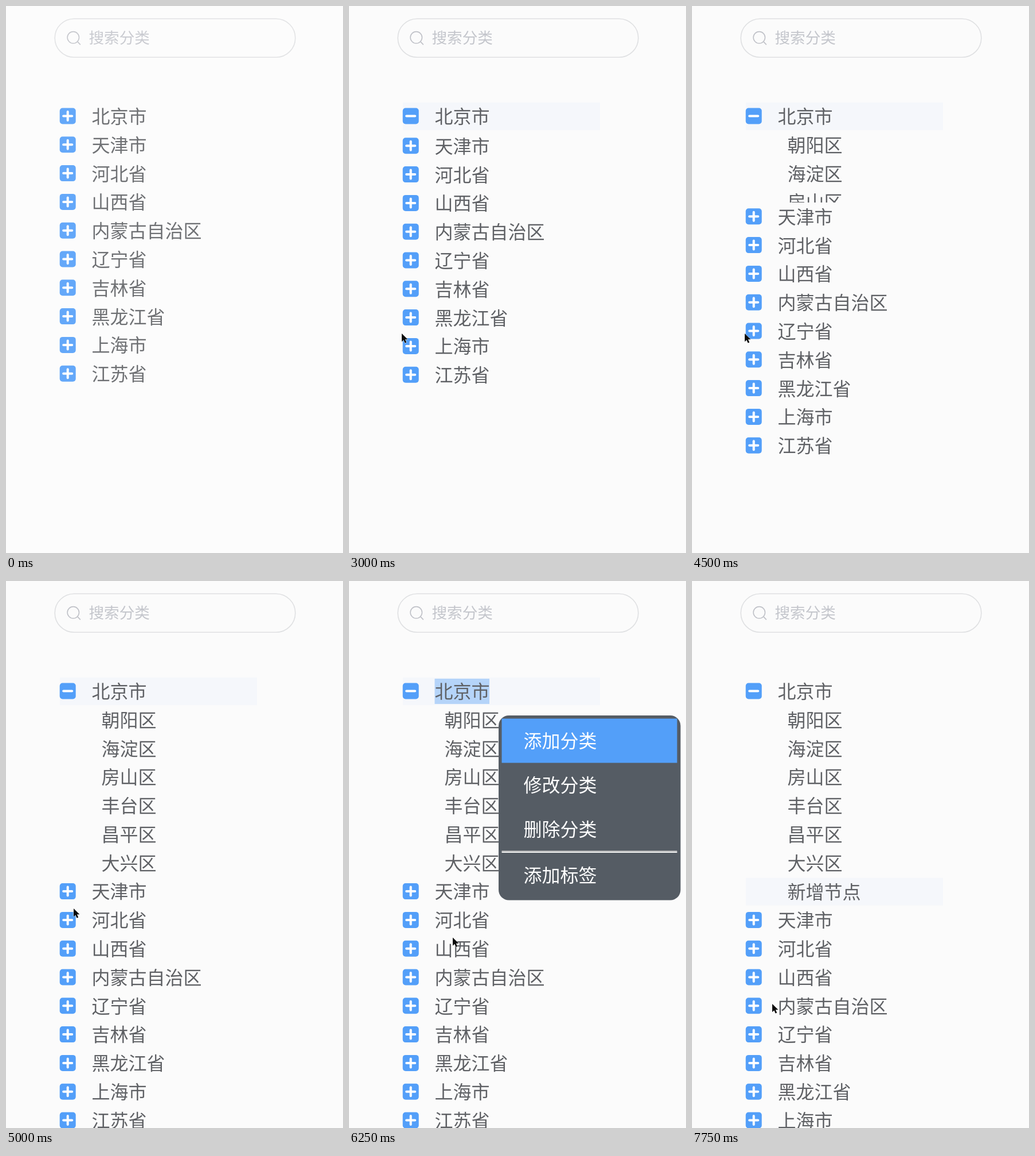
These frames come from a looping animation (588x952 px, 8 s). An HTML page:

```html
<!DOCTYPE html>
<html lang="zh-CN">
<head>
<meta charset="utf-8">
<style>
  html, body { margin: 0; width: 100%; height: 100%; overflow: hidden; background: #fbfbfb; }
  svg { display: block; }
  text { font: 350 32px "Noto Sans CJK SC", "Noto Sans CJK", "Noto Sans CJK JP", sans-serif; fill: #5f6165; }
  #search text { font-size: 26.6px; fill: #c4c6cc; }
  #menu text { fill: #fff; }
  .icon rect { fill: #539ff9; }
  .icon path { stroke: #fff; stroke-width: 4; stroke-linecap: round; }
</style>
</head>
<body>
<svg width="588" height="952" viewBox="0 0 588 952">
  <clipPath id="fold"><rect id="foldBox" x="0" y="217" width="588" height="0"/></clipPath>
  <g id="page">
    <g id="search" fill="none">
      <rect x="85.2" y="22.2" width="419.6" height="67" rx="33.5" stroke="#dfe0e2" stroke-width="1.6"/>
      <path d="M124.8 62.2L129.8 67.4" stroke="#c0c2c8" stroke-width="1.7"/>
      <circle cx="117.3" cy="54.8" r="10.2" stroke="#c0c2c8" stroke-width="1.6"/>
      <text x="144.5" y="65.3">搜索分类</text>
    </g>
    <rect id="current" x="94" width="344" height="48" fill="#f5f7fb"/>
    <rect id="selection" x="149.5" y="170" width="95.5" height="44" fill="#b5d4f9"/>
    <g id="first"></g>
    <g id="children" clip-path="url(#fold)"></g>
    <g id="rest"></g>
  </g>
  <g id="menu">
    <rect x="261" y="234" width="317.5" height="321.5" rx="18" fill="#555c64"/>
    <rect id="hover" x="266.5" y="239.5" width="306" height="77" fill="#539ff9"/>
    <rect x="266.5" y="469" width="306" height="2" fill="#a5a6a8"/>
    <rect x="266.5" y="471" width="306" height="2" fill="#f2f2f2"/>
  </g>
  <path id="cursor" d="M0 0V14.2L3.3 11.2L5.6 16.6L8.2 15.5L5.9 10.3H10.4Z"
        fill="#0a0a0a" stroke="#fff" stroke-width="1" stroke-linejoin="round" paint-order="stroke"/>
</svg>
<script>
const LOOP = 8000, TOP = 191.5, PITCH = 49.8;
const OPEN = PITCH * 6, ADDED = PITCH * 7;
const provinces = ['北京市', '天津市', '河北省', '山西省', '内蒙古自治区', '辽宁省', '吉林省', '黑龙江省', '上海市', '江苏省'];
const districts = ['朝阳区', '海淀区', '房山区', '丰台区', '昌平区', '大兴区', '新增节点'];
const $ = id => document.getElementById(id);

function add(parent, tag, attrs, label = '') {
  const el = document.createElementNS('http://www.w3.org/2000/svg', tag);
  for (const key in attrs) el.setAttribute(key, attrs[key]);
  el.textContent = label;
  return parent.appendChild(el);
}

const rowY = i => TOP + PITCH * i;
const label = (parent, x, y, text) => add(parent, 'text', { x, y: y + 12.4 }, text);

function addProvince(name, i) {
  const parent = $(i ? 'rest' : 'first');
  const icon = add(parent, 'g', { class: 'icon', transform: `translate(107.7 ${rowY(i)})` });
  add(icon, 'rect', { x: -14, y: -14, width: 28, height: 28, rx: 5 });
  add(icon, 'path', { d: 'M-7.5 0H7.5' });
  const bar = add(icon, 'path', { d: 'M0 -7.5V7.5' });
  label(parent, 149.5, rowY(i), name);
  return bar;
}

const firstBar = provinces.map(addProvince)[0];
districts.forEach((name, i) => label($('children'), 166.5, rowY(i + 1), name));
['添加分类', '修改分类', '删除分类', '添加标签'].forEach((name, i) =>
  label($('menu'), 304.5, [278, 355, 431.5, 511.5][i], name));

// Each step keeps the earlier values it does not name.
const steps = [
  [0, { pale: true, shift: 0, minus: false, current: -1, menu: false, hover: false, cursor: null }],
  [250, { pale: false }],
  [750, { cursor: [269, 526] }],
  [1000, { cursor: [205, 552] }],
  [1250, { cursor: [158, 561] }],
  [1500, { cursor: [98, 573] }],
  [1750, { cursor: [92, 570] }],
  [3000, { shift: 2, minus: true, current: 0 }],
  [3250, { shift: OPEN }],
  [4000, { shift: 17.2, minus: false }],
  [4250, { shift: 0 }],
  [4500, { shift: 125, minus: true }],
  [4750, { shift: OPEN }],
  [5000, { cursor: [118, 570] }],
  [5750, { menu: true, cursor: [157, 580] }],
  [6000, { hover: true, cursor: [178, 617] }],
  [6250, { cursor: [181, 620.5] }],
  [6750, { menu: false, shift: ADDED, current: 7 }],
  [7750, { cursor: [140, 736] }]
];

const show = (el, on) => el.setAttribute('visibility', on ? 'inherit' : 'hidden');

function draw(t) {
  const s = Object.assign({}, ...steps.filter(step => step[0] <= t).map(step => step[1]));
  document.body.style.background = s.pale ? '#fcfcfc' : '#fbfbfb';
  $('page').setAttribute('opacity', s.pale ? 0.9 : 1);
  $('rest').setAttribute('transform', `translate(0 ${s.shift})`);
  $('foldBox').setAttribute('height', s.shift);
  $('current').setAttribute('y', rowY(s.current) - 23.5);
  show($('current'), s.current >= 0);
  show(firstBar, !s.minus);
  show($('menu'), s.menu);
  show($('selection'), s.menu);
  show($('hover'), s.menu && s.hover);
  show($('cursor'), s.cursor);
  if (s.cursor) $('cursor').setAttribute('transform', `translate(${s.cursor})`);
}

const start = performance.now();
function tick() {
  draw((performance.now() - start) % LOOP);
  requestAnimationFrame(tick);
}
tick();
</script>
</body>
</html>
```
